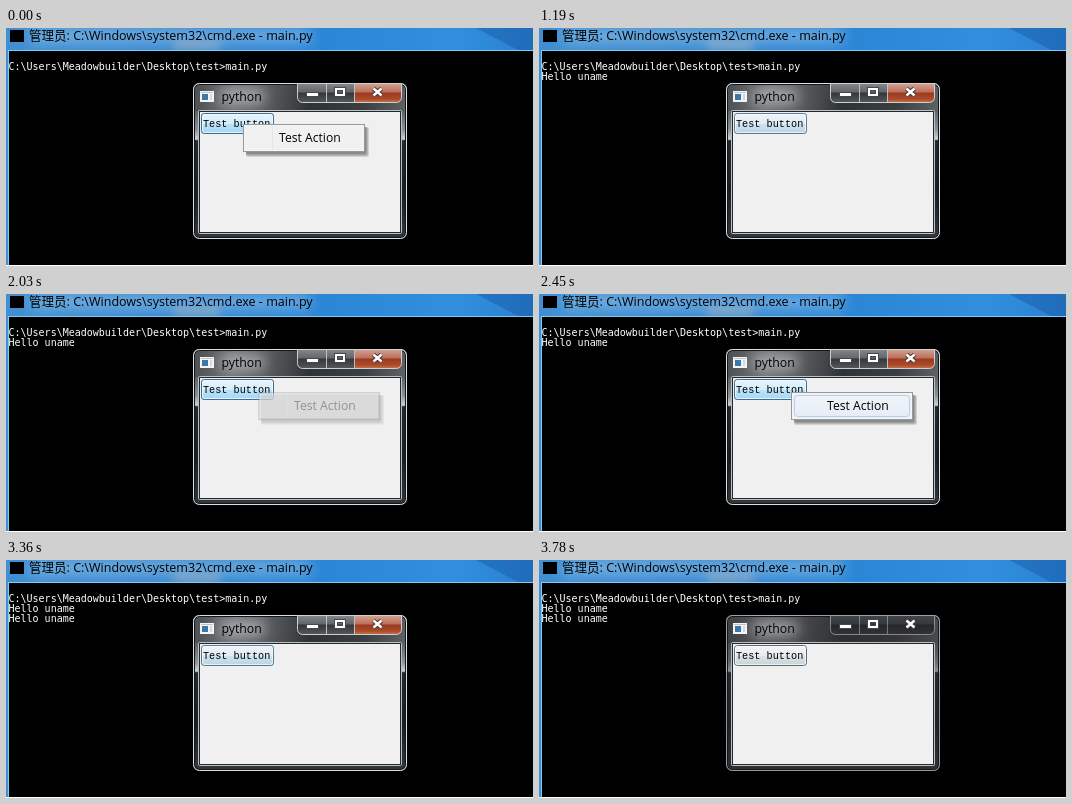
An HTML page with a canvas for the animation above (3.85 s loop, 527x238 px).

```html
<!DOCTYPE html>
<html lang="en">
<head>
<meta charset="utf-8">
<title>Context menu demo</title>
<style>
html, body { margin: 0; width: 100%; height: 100%; overflow: hidden; background: #000; }
canvas { display: block; width: 527px; height: 238px; }
</style>
</head>
<body>
<canvas id="stage" width="527" height="238"></canvas>
<script>
const ctx = document.getElementById("stage").getContext("2d");
const LOOP = 3850, STEP = 70;
const UI = '"Open Sans", "Noto Sans CJK SC", "Noto Sans CJK", sans-serif';
const MONO = '"DejaVu Sans Mono", monospace';
const BUTTON_FONT = '"Liberation Mono", monospace';

const clamp = v => Math.max(0, Math.min(1, v));
// Fade value after n steps, counting the step at `start` as `first`.
const steps = (t, start, n, first) =>
  clamp((Math.floor((t - start) / STEP) + first) / n);

function grad(x0, y0, x1, y1, stops) {
  const g = ctx.createLinearGradient(x0, y0, x1, y1);
  for (const [at, color] of stops) g.addColorStop(at, color);
  return g;
}

function rect(x, y, w, h, fill) {
  ctx.fillStyle = fill;
  ctx.fillRect(x, y, w, h);
}

function round(x, y, w, h, r, fill, stroke) {
  ctx.beginPath();
  ctx.roundRect(x, y, w, h, r);
  if (fill) { ctx.fillStyle = fill; ctx.fill(); }
  if (stroke) { ctx.strokeStyle = stroke; ctx.lineWidth = 1; ctx.stroke(); }
}

function text(str, x, y, size, family, color) {
  ctx.font = size + "px " + family;
  ctx.fillStyle = color;
  ctx.fillText(str, x, y);
}

function withAlpha(alpha, draw) {
  if (alpha <= 0) return;
  ctx.save();
  ctx.globalAlpha *= alpha;
  draw();
  ctx.restore();
}

// Soft patch of light: only the blurred shadow lands on the stage.
function glow(x, y, w, h, blur, color) {
  ctx.save();
  ctx.shadowColor = color;
  ctx.shadowBlur = blur;
  ctx.shadowOffsetX = 2000;
  rect(x - 2000, y, w, h, "#000");
  ctx.restore();
}

function drawConsole(hellos) {
  rect(0, 0, 527, 238, grad(0, 0, 527, 0, [
    [0, "#3f8fd2"], [0.35, "#3787d0"], [0.6, "#2b86d6"], [0.85, "#318fde"], [1, "#2a80d0"]
  ]));
  ctx.save();
  ctx.beginPath();
  ctx.rect(0, 0, 527, 22);
  ctx.clip();
  // Darker diagonal streak in the glass
  ctx.fillStyle = "rgba(10,60,130,.28)";
  ctx.beginPath();
  ctx.moveTo(470, 0); ctx.lineTo(527, 0); ctx.lineTo(527, 22); ctx.lineTo(512, 22);
  ctx.fill();
  glow(24, 2, 280, 12, 14, "rgba(215,235,250,.42)");
  glow(168, 15, 46, 5, 8, "rgba(205,196,184,.7)");
  ctx.restore();
  rect(2, 22, 525, 216, "#7ccdf5");
  rect(3, 23, 524, 214, "#000");
  rect(0, 237, 527, 1, "#fff");
  rect(4, 2, 14, 12, "#000");
  text("管理员: C:\\Windows\\system32\\cmd.exe - main.py", 23, 12, 12.53, UI, "#000");

  text("C:\\Users\\Meadowbuilder\\Desktop\\test>main.py", 2.5, 42, 10, MONO, "#fff");
  for (let i = 0; i < hellos; i++)
    text("Hello uname", 2.5, 52 + 10 * i, 10, MONO, "#fff");
}

function drawCaption(active) {
  const corners = [0, 0, 5, 5];
  round(291.5, 55.5, 104, 19, corners, grad(0, 55, 0, 75, [
    [0, "#85898b"], [0.45, "#63676a"], [0.5, "#34373a"], [1, "#575b5e"]
  ]));
  withAlpha(1 - active, () => round(291.5, 55.5, 104, 19, corners, "rgba(25,28,31,.6)"));
  withAlpha(active, () => round(348.5, 55.5, 47, 19, [0, 0, 5, 0], grad(0, 55, 0, 75, [
    [0, "#d3a596"], [0.45, "#bd705a"], [0.5, "#9c3a22"], [0.8, "#aa4a2a"], [1, "#c97c50"]
  ])));
  withAlpha(0.5 + 0.45 * active, () => {
    round(291.5, 55.5, 104, 19, corners, null, "#d0d5d8");
    rect(320, 56, 1, 18, "#c0c6c9");
    rect(348, 56, 1, 18, "#c0c6c9");
  });

  rect(300, 64, 13, 5, "#43484c");
  rect(301, 65, 11, 3, "#fff");
  ctx.lineWidth = 4;
  ctx.strokeStyle = "#43484c";
  ctx.strokeRect(330, 61, 8, 6);
  ctx.lineWidth = 2;
  ctx.strokeStyle = "#fff";
  ctx.strokeRect(330, 61, 8, 6);
  for (const [width, color] of [[4.4, "#4a3431"], [2.4, "#fff"]]) {
    ctx.lineWidth = width;
    ctx.strokeStyle = color;
    ctx.beginPath();
    ctx.moveTo(367.5, 60.5); ctx.lineTo(375.5, 67.5);
    ctx.moveTo(375.5, 60.5); ctx.lineTo(367.5, 67.5);
    ctx.stroke();
  }
}

function drawButton(hot) {
  const face = (top, upper, lower, bottom) => grad(0, 86, 0, 106, [
    [0, top], [0.48, upper], [0.52, lower], [1, bottom]
  ]);
  round(195.5, 85.5, 72, 20, 3, face("#f3f5f6", "#e8ecee", "#dce2e5", "#c9d2d7"), "#5d6b73");
  withAlpha(hot, () =>
    round(195.5, 85.5, 72, 20, 3, face("#e6f4fc", "#d4edfb", "#b9e2f9", "#a3d6f3"), "#3d6f92"));
  round(196.5, 86.5, 70, 18, 2, null, "rgba(245,252,255,.75)");
  text("Test button", 197, 99, 10.2, BUTTON_FONT, "#000");
}

function drawWindow(active, hot) {
  ctx.save();
  ctx.beginPath();
  ctx.roundRect(187, 55, 214, 156, 6);
  ctx.clip();
  rect(187, 55, 214, 156, grad(0, 55, 0, 211, [
    [0, "#55595c"], [0.18, "#5f6366"], [0.3, "#8d9193"], [0.36, "#d0d3d4"],
    [0.37, "#25282b"], [0.7, "#1b1e21"], [1, "#34383b"]
  ]));
  rect(187, 55, 214, 28, grad(187, 55, 401, 83, [
    [0, "#4c4f52"], [0.2, "#6c6f72"], [0.42, "#4c4f52"], [0.55, "#303336"],
    [0.8, "#3c3f42"], [1, "#606467"]
  ]));
  withAlpha(1 - active, () => rect(187, 55, 214, 156, "rgba(40,42,44,.4)"));
  glow(214, 62, 44, 13, 14, "rgba(205,207,208,.75)");
  ctx.restore();

  round(188.5, 56.5, 211, 153, 5, null, "#14171a");
  withAlpha(0.6 + 0.4 * active, () =>
    round(187.5, 55.5, 213, 155, 6, null, "#dbe2e5"));

  rect(194, 63, 14, 11, "#f2f5f7");
  rect(195, 64, 12, 1, "#b9c4cc");
  rect(196, 66, 6, 6, "#3f76a3");
  rect(204, 66, 2, 6, "#cfd8de");
  text("python", 215.5, 73, 12.3, UI, "#000");
  drawCaption(active);

  round(192.5, 82.5, 203, 123, 1, null, "#b9c1c5");
  rect(193, 83, 202, 122, "#23282b");
  rect(194, 84, 200, 120, "#f0f0f0");
  drawButton(hot);
}

function drawMenu(x, y, hover) {
  for (let i = 4; i > 0; i--)
    round(x + 3, y + 3, 119 + i, 26 + i, 2, "rgba(0,0,0,.13)");
  rect(x, y, 122, 28, "#979797");
  rect(x + 1, y + 1, 120, 26, "#f5f5f5");
  rect(x + 2, y + 2, 118, 24, "#f1f1f1");
  rect(x + 29, y + 2, 1, 24, "#e5e6e6");
  if (hover)
    round(x + 3.5, y + 3.5, 115, 21, 3,
      grad(0, y + 3, 0, y + 25, [[0, "#f1f4f9"], [1, "#e5edf7"]]), "#b2cfef");
  text("Test Action", x + 36, y + 18, 12.2, UI, "#000");
}

function hotness(t) {
  if (t < 910) return 1;
  if (t < 1470) return 1 - steps(t, 910, 7, 0);
  if (t < 3080) return steps(t, 1470, 2, 1);
  return 1 - steps(t, 3080, 7, 0);
}

function draw(t) {
  drawConsole((t >= 910) + (t >= 3080));
  drawWindow(1 - steps(t, 3640, 3, 1), hotness(t));
  if (t < 910) drawMenu(237, 96, t >= 140);
  else if (t >= 2030 && t < 3080)
    withAlpha(steps(t, 2030, 3, 1), () => drawMenu(252, 98, t >= 2450));
}

const start = performance.now();
function tick() {
  draw((performance.now() - start) % LOOP);
  requestAnimationFrame(tick);
}
tick();
</script>
</body>
</html>
```
